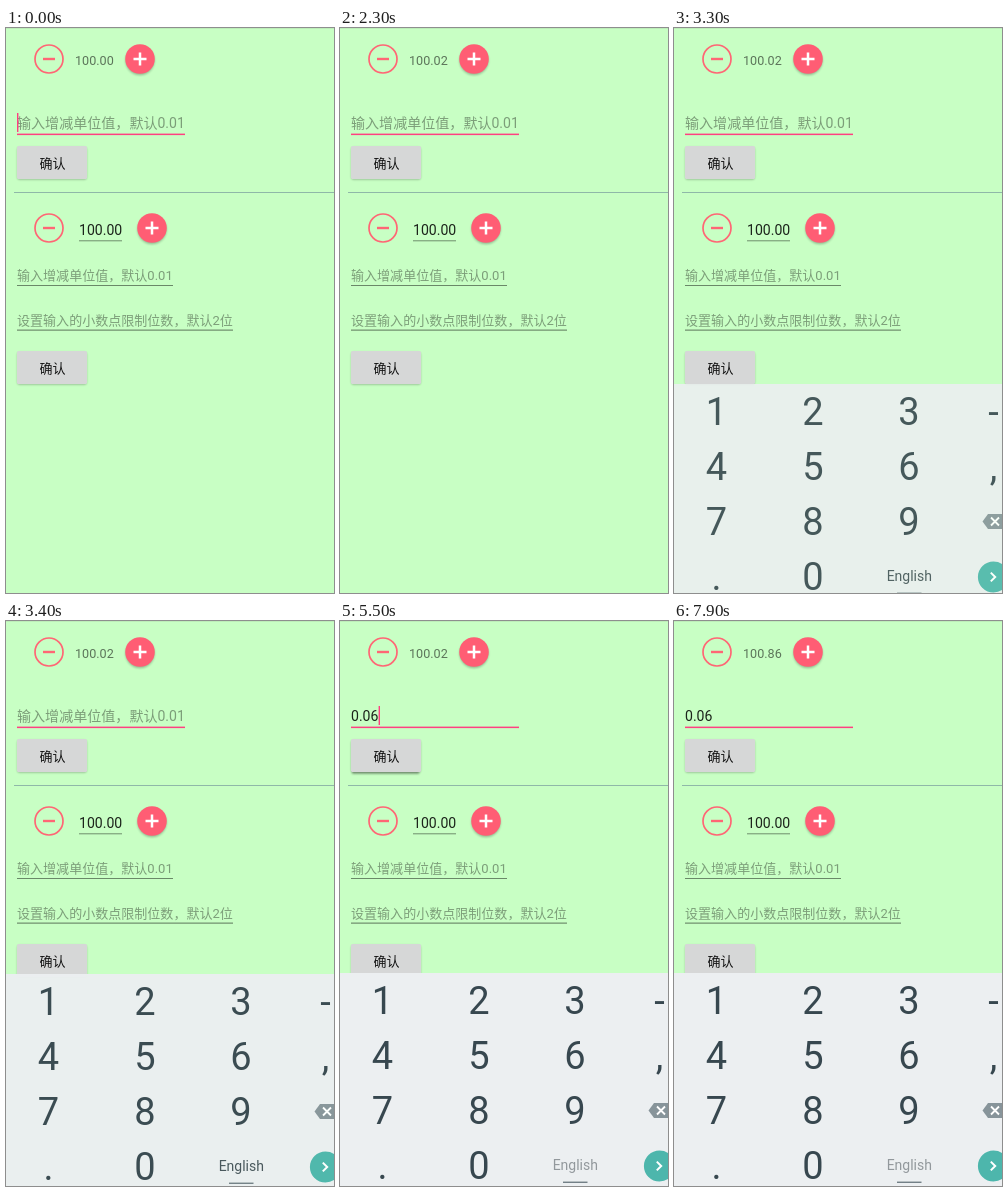
Animation, 328 px wide and 565 px high, one loop 8 s. Source, as an HTML page:

```html
<!DOCTYPE html>
<html lang="zh-CN">
<head>
<meta charset="utf-8">
<title>增减输入</title>
<style>
  html, body { margin: 0; width: 100%; height: 100%; overflow: hidden; background: #c8ffc4; }
  svg { display: block; width: 328px; height: 565px; font-family: Roboto, "Noto Sans CJK SC", "Noto Sans CJK", sans-serif; }
  .hint { fill: #7c9e79; font-size: 13.04px; }
  .label { fill: #111; font-size: 13px; font-weight: 500; text-anchor: middle; }
  .key { fill: #37474f; font-size: 38px; text-anchor: middle; }
</style>
</head>
<body>
<svg viewBox="0 0 328 565">
  <defs>
    <filter id="soft" x="-30%" y="-30%" width="160%" height="180%"><feGaussianBlur stdDeviation="1.2"/></filter>
    <g id="minus" fill="none" stroke="#ff6675" stroke-width="1.7">
      <circle r="14"/>
      <path d="M-6 0H6" stroke-width="2.4"/>
    </g>
    <g id="plus">
      <circle cy="1.6" r="14.6" fill="#000" opacity=".25" filter="url(#soft)"/>
      <circle r="14.8" fill="#ff5d74"/>
      <path d="M-6.5 0H6.5M0 -6.5V6.5" stroke="#fff" stroke-width="2.5"/>
    </g>
    <g id="button">
      <rect x="11.5" y="1.5" width="69" height="32" rx="1.5" fill="#000" opacity=".3" filter="url(#soft)"/>
      <rect x="11" width="70" height="33" rx="1.5" fill="#d6d7d7"/>
      <text class="label" x="46.5" y="21.5">确认</text>
    </g>
  </defs>

  <rect width="328" height="565" fill="#c8ffc4"/>
  <rect width="328" height="1" fill="#bdeeb9"/>

  <use href="#minus" x="43" y="31"/>
  <text id="count" x="69" y="37" font-size="12.6" fill="#5c755a">100.00</text>
  <use href="#plus" x="134" y="31"/>

  <text id="stepHint" class="hint" x="11" y="100.2" style="font-size:14.06px">输入增减单位值，默认0.01</text>
  <text id="typed" x="11" y="100.2" font-size="14.06" fill="#1c241b"></text>
  <rect x="11" y="105.6" width="168" height="1.5" fill="#ff4081"/>
  <rect id="cursor" y="85" width="1.4" height="19" fill="#ff4081"/>

  <rect id="pressed" x="12" y="121" width="67" height="32" fill="#000" opacity=".3" filter="url(#soft)"/>
  <use href="#button" y="118"/>
  <rect x="8" y="164" width="320" height="1" fill="#8fb8a8"/>

  <use href="#minus" x="43" y="200"/>
  <text x="73" y="206.5" font-size="14.06" fill="#1c241b">100.00</text>
  <rect x="73" y="212.3" width="43" height="1" fill="#6f8f6d"/>
  <use href="#plus" x="146" y="200"/>

  <text class="hint" x="11" y="251.7">输入增减单位值，默认0.01</text>
  <rect x="11" y="257" width="156" height="1" fill="#6a8868"/>
  <text class="hint" x="11" y="296.7">设置输入的小数点限制位数，默认2位</text>
  <rect x="11" y="301.6" width="216" height="1" fill="#5c755a"/>
  <use href="#button" y="323"/>

  <g id="keyboard">
    <rect y="352" width="328" height="220" fill="#eceff1"/>
    <g id="keys"></g>
    <text id="lang" x="235.3" y="549.3" font-size="14" text-anchor="middle">English</text>
    <rect x="223" y="560.6" width="24.5" height="1.3" fill="#66757c"/>
    <path d="M308.5 489.5L314 482H334V497H314Z" fill="#87949a"/>
    <path d="M317 485.5l8 8m0 -8l-8 8" stroke="#fff" stroke-width="1.8"/>
    <circle cx="319.5" cy="545" r="15.6" fill="#4db6ac"/>
    <path d="M316.8 540.6l4.4 4.4l-4.4 4.4" fill="none" stroke="#fff" stroke-width="2"/>
  </g>
</svg>
<script>
  const LOOP = 8000;
  const $ = id => document.getElementById(id);

  // Each table lists [start ms, value]; the value holds until the next start.
  const counts = [[0, 0], [800, 1], [1000, 2], [1200, 3], [1800, 2], [6200, 8], [6400, 14], [6700, 20]];
  for (let i = 0; i < 11; i++) counts.push([6900 + i * 100, 26 + i * 6]);
  const texts = [[0, ''], [3500, '0'], [3600, '0.'], [4300, '0.0'], [4600, '0.06']];
  const blinks = [[0, 1], [400, 0], [900, 1], [1400, 0], [1900, 1], [2300, 0], [2800, 1], [3200, 0],
    [3500, 1], [4100, 0], [4300, 1], [5000, 0], [5500, 1], [6000, 0], [6400, 1], [6900, 0], [7400, 1], [7900, 0]];
  const slides = [[0, 4], [3400, 1], [3500, 0]];
  const fades = [[0, .9], [3400, .97], [3500, 1]];
  const langColors = [[0, '#455359'], [4100, '#6c757a'], [4200, '#81888d'], [4300, '#92989c']];
  const cursorX = { 0: 11, 1: 19.2, 2: 22.6, 3: 30.5, 4: 38.6 };

  const at = (steps, t) => steps.reduce((value, [start, next]) => t >= start ? next : value, steps[0][1]);
  const show = (id, on) => $(id).setAttribute('visibility', on ? 'visible' : 'hidden');

  ['123-', '456,', '789', '.0'].forEach((row, r) => [...row].forEach((char, c) => {
    const key = document.createElementNS('http://www.w3.org/2000/svg', 'text');
    key.setAttribute('class', 'key');
    key.setAttribute('x', [42.5, 139, 235, 319.5][c]);
    key.setAttribute('y', 393.3 + r * 55);
    key.textContent = char;
    $('keys').append(key);
  }));

  function draw(t) {
    const text = at(texts, t);
    $('count').textContent = (100 + at(counts, t) / 100).toFixed(2);
    $('typed').textContent = text;
    show('stepHint', !text);
    show('cursor', at(blinks, t));
    $('cursor').setAttribute('x', cursorX[text.length]);
    show('pressed', t >= 5500 && t < 5700);
    show('keyboard', t >= 3300);
    $('keyboard').setAttribute('transform', `translate(0 ${at(slides, t)})`);
    $('keyboard').setAttribute('opacity', at(fades, t));
    $('lang').setAttribute('fill', at(langColors, t));
  }

  const begin = performance.now();
  function tick() {
    draw((performance.now() - begin) % LOOP);
    requestAnimationFrame(tick);
  }
  tick();
</script>
</body>
</html>
```
